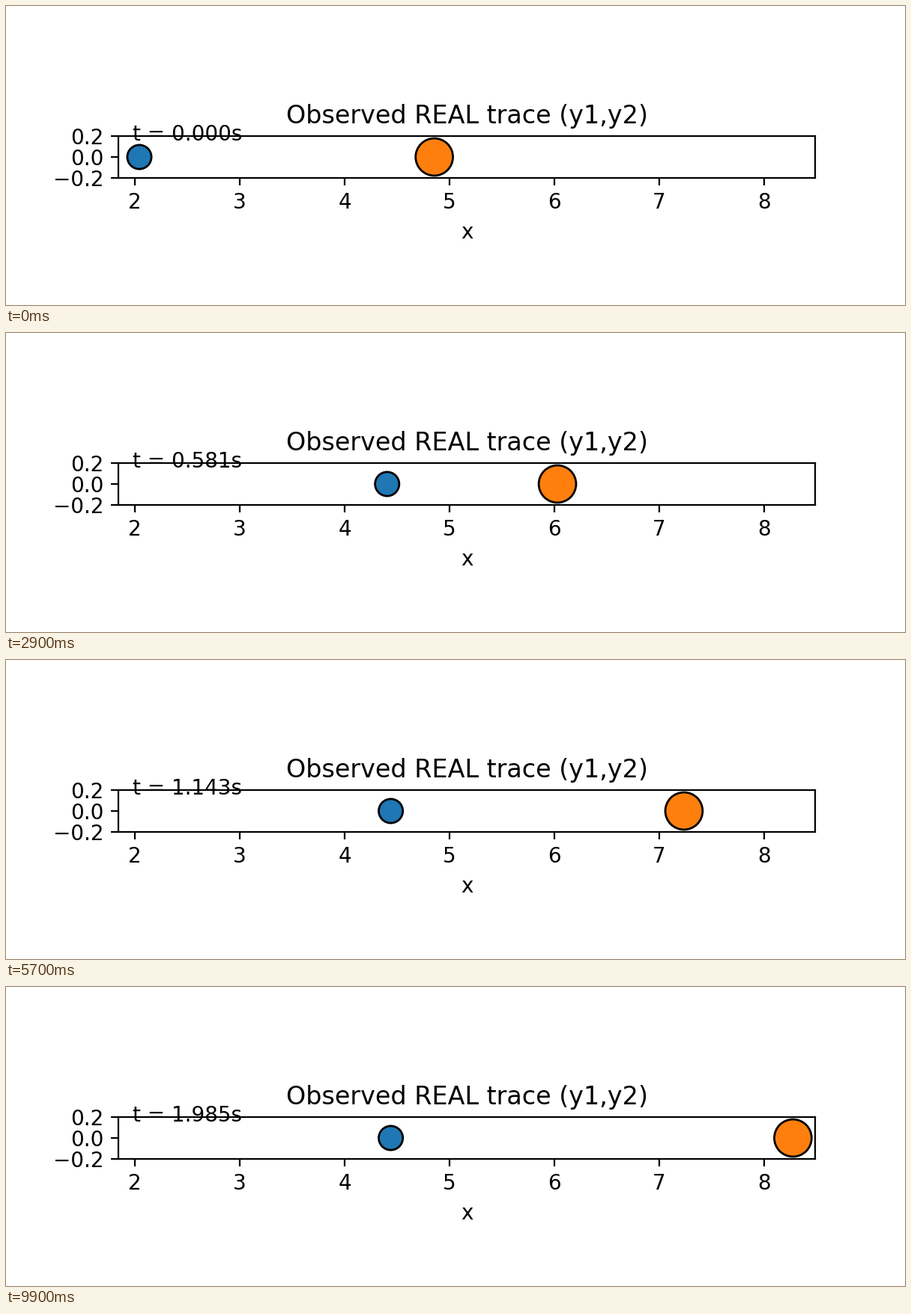
Write a matplotlib script that moves like this. It is 1200 by 400 pixels and loops after 10 s.

```python
import numpy as np
import matplotlib.pyplot as plt
from matplotlib.animation import FuncAnimation
from matplotlib.patches import Circle

FRAMES, INTERVAL = 100, 100
DT = 4 * 2.0 / 399            # simulated seconds per frame
R1, R2 = 0.115, 0.178
X1, X2 = 2.043, 4.855         # starting positions

# Struck ball: smooth slow-down through a few positions
STEPS = [11, 17, 22, 29, 33, 45, 55, 69, 77, 82, 88, 99]
PLACES = [5.040, 5.393, 5.668, 6.029, 6.225, 6.762,
          7.161, 7.640, 7.861, 7.979, 8.104, 8.276]
glide = np.poly1d(np.polyfit(STEPS, PLACES, 4))

# Striking ball: rebounds, turns, creeps forward and stops
HIT = 7.95
ACC = 0.000682
TURN, HALF = 29.4, 7.16
LOW = 4.4053
REST = LOW + ACC * HALF ** 2


def striker(k):
    if k < HIT:
        return X1 + (X2 - R1 - R2 - X1) * k / HIT
    if k < TURN + HALF:
        return LOW + ACC * (k - TURN) ** 2 / 2
    return REST - ACC * max(TURN + 2 * HALF - k, 0) ** 2 / 2


def struck(k):
    return X2 if k < HIT else glide(k)


plt.rcParams["font.family"] = "DejaVu Sans"
fig, ax = plt.subplots(figsize=(6, 2), dpi=200)
ax.set_xlim(1.843, 8.486)
ax.set_ylim(-0.2, 0.2)
ax.set_aspect("equal")
ax.set_xticks(range(2, 9))
ax.set_yticks([-0.2, 0.0, 0.2])
ax.set_xlabel("x")
ax.set_title("Observed REAL trace (y1,y2)")

ball1 = ax.add_patch(Circle((X1, 0), R1, fc="C0", ec="k", lw=1))
ball2 = ax.add_patch(Circle((X2, 0), R2, fc="C1", ec="k", lw=1))
clock = ax.text(0.02, 0.9, "", transform=ax.transAxes)


def update(k):
    ball1.center = striker(k), 0
    ball2.center = struck(k), 0
    clock.set_text(f"t = {k * DT:.3f}s")
    return ball1, ball2, clock


anim = FuncAnimation(fig, update, frames=FRAMES, interval=INTERVAL,
                     repeat=True, repeat_delay=0)
plt.show()
```
